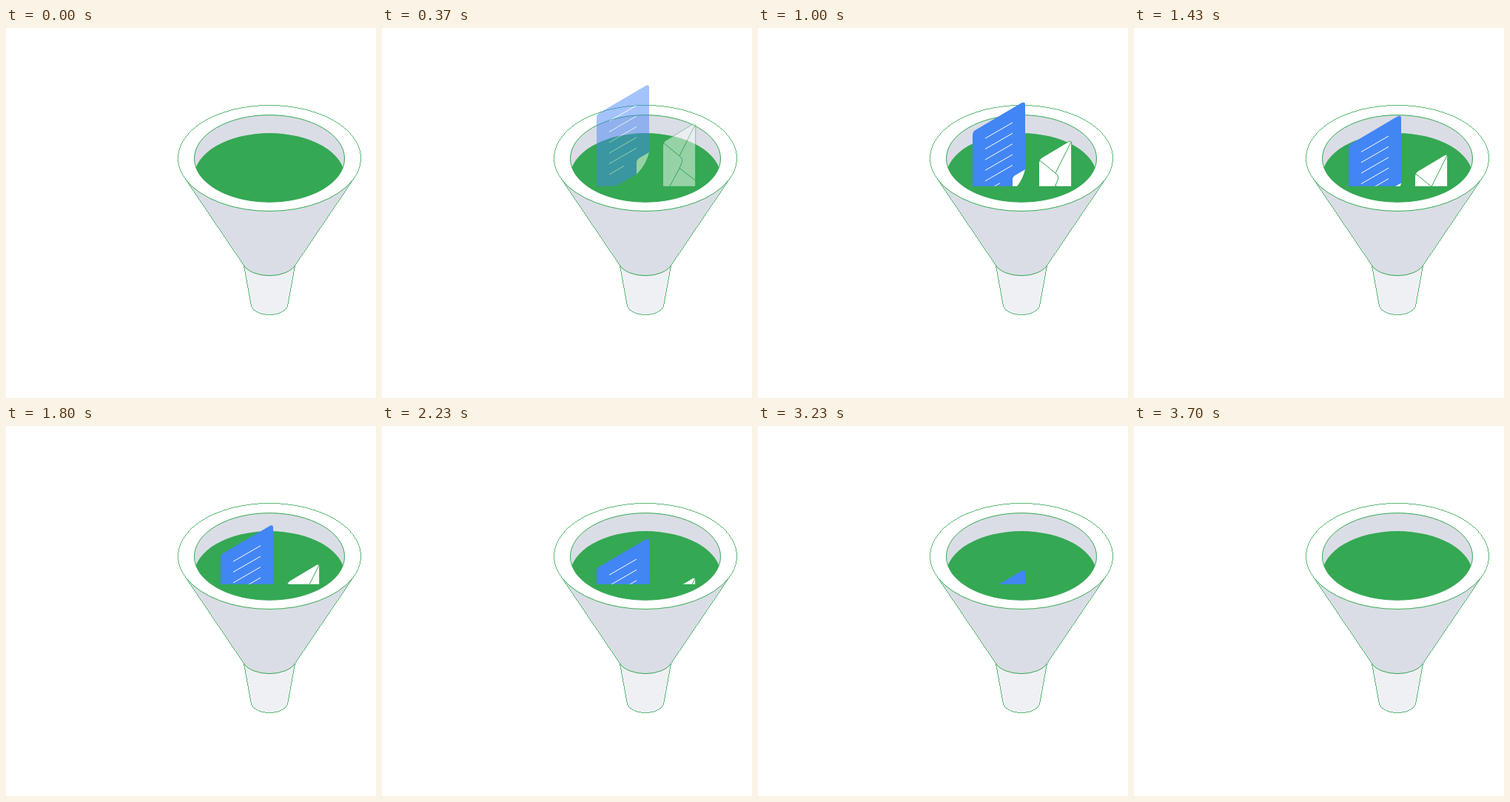
An HTML page that plays this animation: 500x500 px, repeating every 4030 ms.

```html
<!DOCTYPE html>
<html lang="en">
<head>
<meta charset="utf-8">
<title>Funnel</title>
<style>
  html, body { margin: 0; width: 100%; height: 100%; overflow: hidden; background: #fff; }
  svg { display: block; width: 100vw; height: 100vh; }
  .line { fill: none; stroke: #34a853; }
  .crisp { shape-rendering: crispEdges; stroke-width: .8; }
</style>
</head>
<body>
<svg viewBox="0 0 500 500">
  <defs>
    <clipPath id="bowl"><ellipse cx="356" cy="176.4" rx="101.5" ry="58.8"/></clipPath>
    <clipPath id="surface"><rect width="500" height="213.7"/></clipPath>
  </defs>

  <!-- Neck and cone -->
  <path fill="#eff0f4" d="M321.500 321 331.500 376A25 14.500 0 0 0 380.500 376L390.500 321Z"/>
  <path class="line crisp" d="M321.500 321 331.500 376A25 14.500 0 0 0 380.500 376L390.500 321"/>
  <path fill="#dadde5" d="M241 202 321.500 321A37 21.400 0 0 0 390.500 321L471 202Z"/>
  <path class="line" d="M321.500 321A37 21.400 0 0 0 390.500 321"/>
  <path class="line crisp" d="M241 202 321.500 321M471 202 390.500 321"/>

  <!-- Rim and liquid -->
  <ellipse cx="356" cy="176" rx="123.5" ry="71.5" fill="#fff"/>
  <path class="line crisp" d="M244 206.1A123.5 71.5 0 1 1 468 206.1"/>
  <path class="line" d="M244 206.1A123.5 71.5 0 0 0 468 206.1"/>
  <ellipse cx="356" cy="176.4" rx="101.5" ry="58.8" fill="#dadde5"/>
  <ellipse cx="356" cy="200.8" rx="101.5" ry="58.8" fill="#34a853" clip-path="url(#bowl)"/>
  <ellipse class="line" cx="356" cy="176.4" rx="101.5" ry="58.8"/>

  <g clip-path="url(#surface)">
    <g id="items">
      <g id="page">
        <path fill="#4285f4" d="M290 235V128Q290 122.500 295 120.500L356 84.700Q361 82 361 87V174.500L344 204.300Z"/>
        <path fill="#fff" d="M361 174.500 348 182Q344 184.300 344 188V204.300Q357 191 361 174.500Z"/>
      </g>
      <g id="envelope" stroke="#34a853">
        <path fill="#fff" d="M379.500 226V166Q379.500 161 383.500 158.500L419.500 137Q423.700 135 423.700 139.500V226Z"/>
        <path fill="none" d="M380.500 162 402 179.500 423 137.500M402 179.500Q408 184 404.500 190L402 196 388 222M402 196 424 213"/>
      </g>
    </g>
  </g>
</svg>
<script>
  const LOOP = 4030, START = 70, FADE = 620, SPEED = 0.0424;
  const items = document.getElementById('items');

  // Lines of writing; the last one is short.
  let writing = '';
  for (let i = 0; i < 6; i++) {
    const width = i < 5 ? 37 : 20;
    writing += `M307 ${132.5 + i * 14.4}l${width} ${-width * 0.577}`;
  }
  document.getElementById('page').insertAdjacentHTML('beforeend',
    `<path d="${writing}" fill="none" stroke="#fff"/>`);

  // Speed up during the fade, then sink at a steady rate.
  function draw(now) {
    const t = now % LOOP;
    const s = Math.min(Math.max(t - START, 0), FADE);
    const fall = s * s / (2 * FADE) + Math.max(0, t - START - FADE);
    items.setAttribute('transform', `translate(0 ${SPEED * (fall - 228)})`);
    items.setAttribute('opacity', t < 3700 ? s / FADE : 0);
  }

  const begin = performance.now();
  function tick() {
    draw(performance.now() - begin);
    requestAnimationFrame(tick);
  }
  tick();
</script>
</body>
</html>
```
